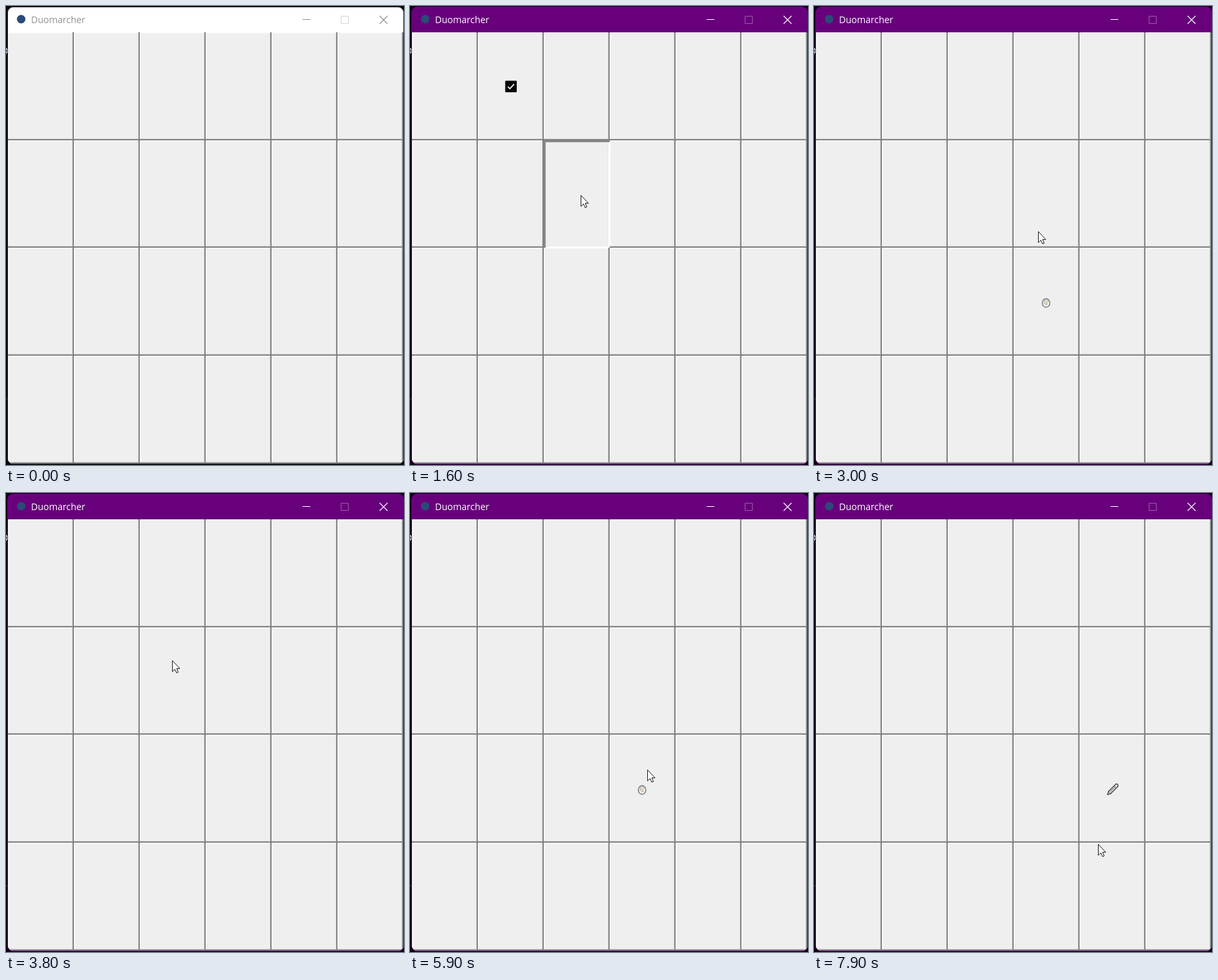
Recreate the animation shown at these times as an HTML page. Size 604 by 697 pixels, loop 8000 ms.

```html
<!DOCTYPE html>
<html lang="en">
<head>
<meta charset="utf-8">
<title>Duomarcher</title>
<style>
  html, body { margin: 0; width: 100%; height: 100%; overflow: hidden; background: #08080a; }
  #stage { position: relative; width: 604px; height: 697px; overflow: hidden; background: #08080a;
    --bar: #fff; --edge: #262626; --ink: #929292; --line: #8c8c8c; --dim: #d4d4d4; }
  #stage.active { --bar: #68007c; --edge: #68007c; --ink: #fff; --line: #fff; --dim: #9a5aa6; background: #100015; }
  #win { position: absolute; left: 2px; top: 1px; width: 602px; height: 695px; box-sizing: border-box;
    border: 1px solid var(--edge); border-radius: 9px; overflow: hidden; background: var(--bar); }
  #name { position: absolute; left: 35px; top: -1px; font: 14px/39px "Open Sans", "Noto Sans", sans-serif; color: var(--ink); }
  #grid { position: absolute; left: 0; top: 38px; width: 600px; height: 654.5px;
    display: grid; grid-template: repeat(4, 1fr) / repeat(6, 1fr); }
  svg { position: absolute; left: 0; top: 0; }
  .cell { background: #efefef;
    box-shadow: inset -1px -1px #7a7a7a, inset -2px -2px #8e8e8e, inset -3px -3px #dedede, inset 1px 1px #fbfbfb, inset 2px 2px #f5f5f5; }
  .cell.down { box-shadow: inset 2px 2px #868686, inset 3px 3px #9a9a9a, inset -2px -2px #fff, inset -3px -3px #e9e9e9; }
  .hidden { visibility: hidden; }
</style>
</head>
<body>
<div id="stage">
  <svg width="604" height="697">
    <path d="M0 64.5Q1.8 65 1.8 68T0 71.5" fill="none" stroke="#dde4ee" stroke-width="1.4"/>
    <path d="M0 596.5H2" stroke="#45454d"/>
  </svg>
  <div id="win">
    <div id="name">Duomarcher</div>
    <div id="grid"></div>
  </div>
  <svg width="604" height="697" fill="none" stroke-linejoin="round">
    <circle cx="23" cy="20" r="6.5" fill="#2b4a78"/>
    <path d="M450 20.5H462M567 15L579 27M579 15L567 27" stroke="var(--line)" stroke-width="1.1"/>
    <rect x="508.5" y="15.5" width="11" height="11" stroke="var(--dim)"/>
    <g id="check">
      <rect x="-8.5" y="-8.5" width="17.5" height="17.5" rx="1" fill="#050505"/>
      <path d="M-4.5 .5L-1.4 3.6L5 -3.4" stroke="#f4f4f4" stroke-width="1.7"/>
    </g>
    <g id="fist">
      <ellipse cx="-.8" cy="1" rx="5.8" ry="6.6" fill="#f0ebe2" stroke="#616d74" stroke-width="1.2"/>
      <path d="M-3.5 -4V0M-.8 -5V-1M2 -4V0M-5 1H.5V3.5H-2" stroke="#a79c90" stroke-width=".9"/>
    </g>
    <g id="pencil" stroke="#444">
      <path d="M-7.5 8L-6.2 3.2L4.3 -7.3Q6 -9 7.8 -7.4Q9.4 -5.6 7.7 -3.9L-2.7 6.6Z" fill="#f3ede6" stroke-width="1.4"/>
      <path d="M-6.2 3.2L-2.7 6.6M2.3 -5.3L5.8 -1.9M-3.7 3.9L3.8 -3.6"/>
    </g>
    <path id="cursor" d="M.5 .5V17.2L4.4 13.6L6.9 19.2L9.4 18.1L7 12.6H11.8Z" fill="#fff" stroke="#1a1a1a"/>
  </svg>
</div>
<script>
const LOOP = 8000, STEP = 100, SHOW = 1000;
const COLS = 6, ROWS = 4;
const $ = id => document.getElementById(id);

for (let i = 0; i < COLS * ROWS; i++) {
  $('grid').append(Object.assign(document.createElement('div'), { className: 'cell' }));
}
const cells = [...$('grid').children];

// A pressed card shows its symbol on release, then hides it again
const clicks = [
  { at: 1100, col: 1, row: 0, icon: 'check' },
  { at: 1600, col: 2, row: 1 },
  { at: 2600, col: 3, row: 2, icon: 'fist' },
  { at: 5800, col: 3, row: 2, icon: 'fist' },
  { at: 6300, col: 2, row: 1 },
  { at: 7600, col: 4, row: 2, icon: 'pencil' }
];

// Pointer moves: start, end, x, y; it rests in between
const ENTER = 400;
const moves = [
  [ENTER, 500, 132, 140],
  [600, 900, 149, 153],
  [1200, 1400, 259, 287],
  [1900, 2500, 336, 455],
  [2700, 3000, 340, 342],
  [5500, 5700, 360, 420],
  [6000, 6300, 258, 290],
  [6400, 6900, 106, 302],
  [7000, 7100, 200, 301],
  [7200, 7600, 446, 460],
  [7700, 7900, 431, 533]
];
const swing = { from: 3200, to: 5400, half: 348, left: 5000 };

// Side-to-side sweep that sinks slowly
function swingAt(t) {
  const x = 225 - 165 * Math.cos(Math.PI * (t - swing.left) / swing.half);
  const y = 254 + 59 * ((t - 3800) / 1600) ** 2;
  return [x, y];
}

function pointerAt(t) {
  if (t >= swing.from && t <= swing.to) return swingAt(t);
  let pos = [132, 117];
  for (const [start, end, ...goal] of moves) {
    if (t < start) break;
    if (start > swing.to && pos[1] === 342) pos = swingAt(swing.to);
    const k = Math.min(1, (t - start) / (end - start));
    const ease = (1 - Math.cos(Math.PI * k)) / 2;
    pos = pos.map((p, i) => p + (goal[i] - p) * ease);
  }
  return t > swing.to && t < 5500 ? swingAt(swing.to) : pos;
}

function place(id, [x, y]) {
  $(id).setAttribute('transform', `translate(${Math.round(x)} ${Math.round(y)})`);
}

function draw(t) {
  $('stage').classList.toggle('active', t >= clicks[0].at);
  for (const el of cells) el.classList.remove('down');
  for (const id of ['check', 'fist', 'pencil']) $(id).classList.add('hidden');

  for (const { at, col, row, icon } of clicks) {
    const age = t - at - STEP;
    if (age < 0 && age >= -STEP) cells[row * COLS + col].classList.add('down');
    if (icon && age >= 0 && age < SHOW) {
      place(icon, [53 + col * 100, 122 + row * 164]);
      $(icon).classList.remove('hidden');
    }
  }

  $('cursor').classList.toggle('hidden', t < ENTER);
  place('cursor', pointerAt(t));
}

const start = performance.now();
function tick() {
  const t = (performance.now() - start) % LOOP;
  draw(Math.floor(t / STEP) * STEP);
  requestAnimationFrame(tick);
}
tick();
</script>
</body>
</html>
```
